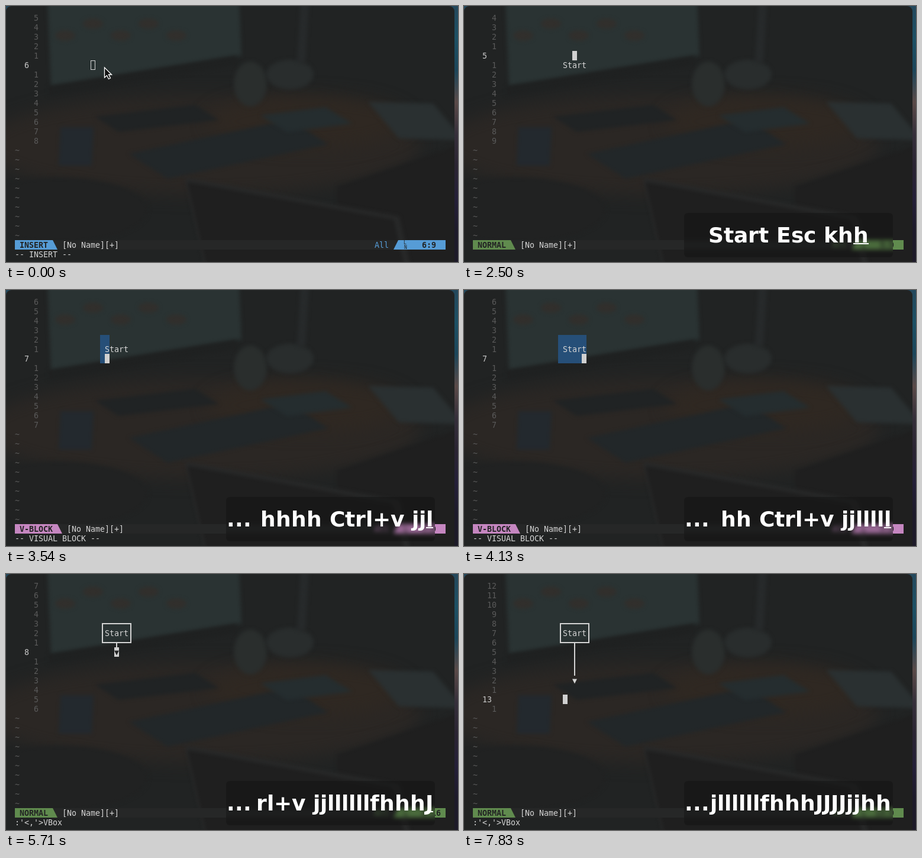
Recreate the animation shown at these times as an HTML page with a canvas. Size 764 by 433 pixels, loop 8000 ms.

```html
<!DOCTYPE html>
<html>
<head>
<meta charset="utf-8">
<style>
  html, body { margin: 0; width: 100%; height: 100%; overflow: hidden; background: #222; }
  canvas { display: block; }
</style>
</head>
<body>
<canvas id="stage" width="764" height="433"></canvas>
<script>
const W = 764, H = 433, LOOP = 8000;
const canvas = document.getElementById('stage');
const ctx = canvas.getContext('2d');
const MONO = '13.33px "DejaVu Sans Mono", monospace';
const KEY_FONT = 'bold 36px "DejaVu Sans", sans-serif';
const FG = '#d4d4d4', DIM = '#5a5a5a', DARK = '#222323';
const MODE_COLORS = { INSERT: '#569cd6', NORMAL: '#608b4e', 'V-BLOCK': '#c586c0' };

// Bursts of typing, each at an even pace
const burst = (start, pace, keys) => keys.map((key, i) => ({ key, time: start + i * pace }));
const PRESSES = [
  burst(1000, 0, ['S']),
  burst(1500, 0, [...'tar']),
  burst(1750, 170, ['t', 'Esc']),
  burst(2205, 145, [...'khhhhh', 'Ctrl+v']),
  burst(3215, 152, [...'jjllllllf']),
  burst(4880, 165, [...'hhh']),
  burst(5710, 175, [...'JJJJ']),
  burst(7250, 0, [...'jj']),
  burst(7420, 210, [...'hh']),
].flat();

const cellX = col => 63 + col * 8;
const rowY = line => 12 + (line - 1) * 16;

function rect(c, color, x, y, w, h) {
  c.fillStyle = color;
  c.fillRect(x, y, w, h);
}

function poly(c, color, ...pts) {
  c.fillStyle = color;
  c.beginPath();
  for (let i = 0; i < pts.length; i += 2) c.lineTo(pts[i], pts[i + 1]);
  c.closePath();
  c.fill();
}

// One glyph per terminal cell
function text(str, x, top, color, bold) {
  ctx.font = (bold ? 'bold ' : '') + MONO;
  ctx.fillStyle = color;
  [...str].forEach((ch, i) => ctx.fillText(ch, x + i * 8, top + 13));
}

// Dimmed desk scene behind the terminal, painted once
function paintBackdrop() {
  const layer = document.createElement('canvas');
  layer.width = W;
  layer.height = H;
  const c = layer.getContext('2d');
  const slab = (color, x, y, ax, ay, bx, by) =>
    poly(c, color, x, y, x + ax, y + ay, x + ax + bx, y + ay + by, x + bx, y + by);
  const blob = (color, x, y, rx, ry) => {
    c.fillStyle = color;
    c.beginPath();
    c.ellipse(x, y, rx, ry, 0, 0, 7);
    c.fill();
  };

  const strip = c.createLinearGradient(0, 0, 0, H);
  ['#24485c', '#1d5064', '#1c465a', '#5a4a48', '#352f3a', '#2a2432', '#241f38', '#1d1a2a', '#1d1a28']
    .forEach((color, i) => strip.addColorStop(i / 8, color));
  rect(c, strip, 0, 0, W, H);

  c.beginPath();
  c.roundRect(0, 0, 758, H + 10, 9);
  c.clip();
  rect(c, '#212323', 0, 0, W, H);
  c.filter = 'blur(14px)';
  blob('#2b2724', 330, 235, 370, 85);
  blob('#2f2822', 510, 195, 170, 45);
  c.filter = 'blur(3px)';
  slab('#2a3333', 68, -60, 322, -52, 8, 196);
  slab('#1f2121', 72, 136, 318, -52, 0, 16);
  for (let i = 0; i < 5; i++) blob('#312f2c', 100 + i * 47, 50 - 20 * (i % 2), 17, 9);
  slab('#202324', 150, 187, 170, -20, 40, 26);
  slab('#222729', 208, 250, 272, -58, 65, 42);
  blob('#2a2e2d', 413, 132, 28, 38);
  blob('#292d2d', 480, 116, 40, 25);
  slab('#272a2b', 498, -5, 14, 0, -6, 100);
  slab('#252d2f', 430, 185, 110, -14, 45, 28);
  slab('#2a3031', 612, 162, 110, 3, 52, 62);
  slab('#23292e', 92, 205, 56, 0, -3, 65);
  blob('#212222', 90, 345, 150, 55);
  slab('#1f1f1f', 560, 305, 220, -75, 0, 220);
  slab('#292a2a', 302, 290, 362, 66, 34, 150);
  slab('#1f1f1f', 306, 297, 350, 64, 34, 150);
  return layer;
}

function stateAt(t) {
  const s = {
    line: 6, col: 10 + pointerStep(t),
    mode: 'INSERT', typed: '', keys: '', lastKey: '', lastTime: 0, boxed: false, arrow: 0,
  };
  for (const { key, time } of PRESSES) {
    if (time > t) break;
    s.keys += key.length > 1 ? ` ${key} ` : key;
    s.lastKey = key;
    s.lastTime = time;
    if (key === 'Esc') { s.mode = 'NORMAL'; s.col--; }
    else if (s.mode === 'INSERT') { s.typed += key; s.col++; }
    else if (key === 'Ctrl+v') { s.mode = 'V-BLOCK'; s.from = { line: s.line, col: s.col }; }
    else if (key === 'f') { s.mode = 'NORMAL'; s.boxed = true; }
    else if (key === 'J') s.arrow = ++s.line;
    else {
      s.col += (key === 'l') - (key === 'h');
      s.line += (key === 'j') - (key === 'k');
    }
  }
  return s;
}

// Byte column; blank lines hold eight spaces, box lines are three bytes per glyph
function byteColumn(s) {
  if (s.line === 6 && s.typed) return s.col + 1;
  if (s.line === 7 && s.boxed) return 13 + 3 * (s.col - 12);
  return s.line > 7 && s.line <= s.arrow ? 16 : 9;
}

function drawBuffer(s, color) {
  text(s.typed, cellX(13), rowY(6), color);
  if (s.boxed) {
    ctx.strokeStyle = color;
    ctx.lineWidth = 2;
    ctx.strokeRect(163, 84, 48, 32);
  }
  if (s.arrow) {
    rect(ctx, color, 186, 115, 2, rowY(s.arrow) - 115);
    text('▼', cellX(15), rowY(s.arrow), color);
  }
}

function drawCursor(s, t) {
  const x = cellX(s.col), y = rowY(s.line);
  if (t < 170) {
    ctx.strokeStyle = FG;
    ctx.lineWidth = 1;
    ctx.strokeRect(x + .5, y + .5, 7, 15);
  } else if (s.mode === 'INSERT') {
    rect(ctx, '#e4e4e4', x, y, 2, 16);
  } else {
    ctx.save();
    ctx.beginPath();
    ctx.rect(x, y, 8, 16);
    ctx.clip();
    rect(ctx, '#d0d0d0', x, y, 8, 16);
    drawBuffer(s, DARK);
    ctx.restore();
  }
}

function drawStatus(s) {
  const color = MODE_COLORS[s.mode];
  const end = 15 + (s.mode.length + 2) * 8;
  rect(ctx, '#262727', 15, 396, 728, 16);
  poly(ctx, color, 15, 396, end, 396, end + 8, 412, 15, 412);
  text(s.mode, 23, 396, DARK, true);
  text('[No Name][+]', end + 16, 396, FG);
  text('All', 623, 396, color);
  poly(ctx, color, 663, 396, 743, 396, 743, 412, 655, 412);
  text(String(s.line).padStart(3) + ':' + byteColumn(s), 687, 396, DARK, true);
  ctx.font = '8px "DejaVu Sans Mono", monospace';
  ctx.fillText('L', 672, 403);
  ctx.fillText('N', 673, 411);
  const message = s.boxed ? ":'<,'>VBox"
    : { INSERT: '-- INSERT --', NORMAL: '', 'V-BLOCK': '-- VISUAL BLOCK --' }[s.mode];
  text(message, 15, 412, FG);
}

// Key labels use whole-pixel advances
const advance = ch => Math.round(ctx.measureText(ch).width);
const keyWidth = str => [...str].reduce((sum, ch) => sum + advance(ch), 0);

function keyText(str, x) {
  for (const ch of str) {
    ctx.fillText(ch, x, 400);
    x += advance(ch);
  }
}

function drawKeys(s, t) {
  if (!s.keys) return;
  ctx.save();
  ctx.beginPath();
  ctx.roundRect(372, 350, 353, 75, 6);
  ctx.clip();
  ctx.filter = 'blur(3.5px)';
  ctx.drawImage(canvas, 0, 0);
  ctx.filter = 'none';
  rect(ctx, 'rgba(0,0,0,.23)', 372, 350, 353, 75);

  ctx.font = KEY_FONT;
  ctx.fillStyle = '#fff';
  let shown = s.keys.trimEnd(), right = Math.round(548.5 + keyWidth(shown) / 2);
  if (keyWidth(shown) > 353) {
    while (keyWidth(shown) > 311) shown = shown.slice(1);
    keyText('...', 373);
    right = 722;
  }
  keyText(shown, right - keyWidth(shown));
  if (s.mode === 'INSERT' || t - s.lastTime < 200) {
    const w = keyWidth(s.lastKey);
    ctx.fillRect(right - w, 401, w, 2);
  }
  ctx.restore();
}

// The pointer leaves in three steps while the caret moves into place
const pointerStep = t => Math.max(0, Math.min(3, Math.ceil((t - 169) / 54)));

function drawPointer(t) {
  if (t >= 330) return;
  ctx.save();
  ctx.translate(166.5 - pointerStep(t) * 37, 104);
  ctx.strokeStyle = '#fff';
  ctx.lineWidth = 1.3;
  poly(ctx, '#111', 0, 0, 0, 17, 4, 13.5, 7, 19.5, 10, 18, 7, 12, 12, 12);
  ctx.stroke();
  ctx.restore();
}

const backdrop = paintBackdrop();

function draw(t) {
  const s = stateAt(t);
  ctx.drawImage(backdrop, 0, 0);
  for (let line = 1; line <= 14; line++) {
    const away = Math.abs(line - s.line);
    if (away) text(String(away).padStart(3), 31, rowY(line), DIM);
    else text(String(line), 31, rowY(line), '#c8c8c8');
  }
  for (let line = 15; line <= 24; line++) text('~', 15, rowY(line), DIM);
  if (s.mode === 'V-BLOCK') {
    const { line, col } = s.from;
    rect(ctx, '#264f78', cellX(col), rowY(line), (s.col - col + 1) * 8, (s.line - line + 1) * 16);
  }
  drawBuffer(s, FG);
  drawCursor(s, t);
  drawStatus(s);
  drawKeys(s, t);
  drawPointer(t);
}

function tick() {
  draw(performance.now() % LOOP);
  requestAnimationFrame(tick);
}
tick();
</script>
</body>
</html>
```
